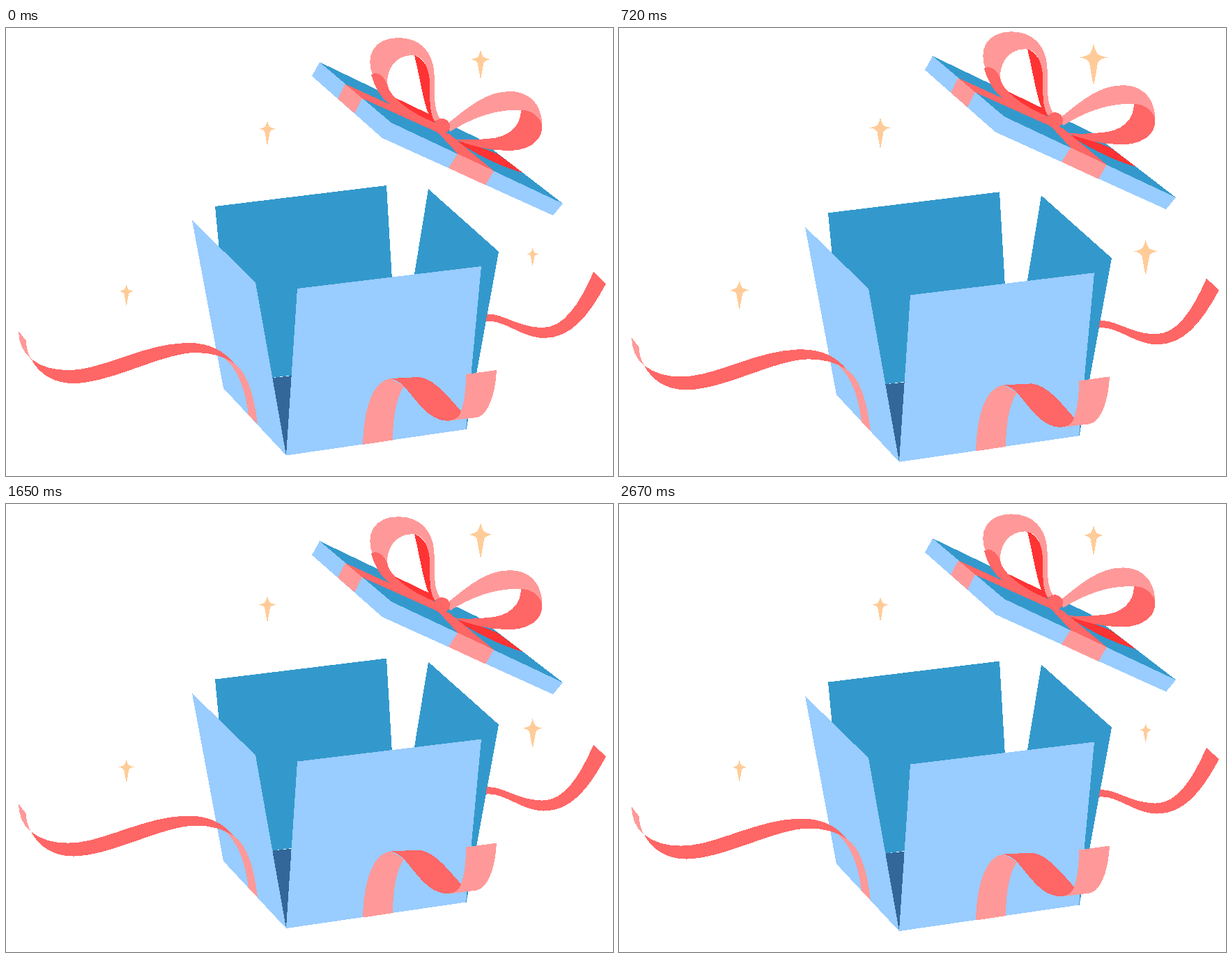
An HTML page for the animation above (2700 ms loop, 871x643 px).

```html
<!DOCTYPE html>
<html lang="en">
<head>
<meta charset="utf-8">
<title>Gift box</title>
<style>
  html, body { margin: 0; width: 100%; height: 100%; overflow: hidden; background: #fff; }
  svg { display: block; width: 100%; height: 100%; shape-rendering: crispEdges; }
  .sky { fill: #99ccff; }
  .blue { fill: #3399cc; }
  .navy { fill: #336699; }
  .pink { fill: #ff9999; }
  .coral { fill: #ff6666; }
  .red { fill: #ff3333; }
  .star { fill: #ffcc99; }
</style>
</head>
<body>
<svg viewBox="0 0 871 643">
  <g id="box">
    <path class="blue" d="M300 256L546 226L561 480L324 509Z"/>
    <path class="navy" d="M378 502.500L415 498.500L402 613.500Z"/>
    <path class="blue" d="M606 231L707 321L660.500 576L580 390Z"/>
    <path class="sky" d="M267 276L358 365L402 613.500L312 517Z"/>
    <path class="sky" d="M418 374L682 342L660 576L402 613.500Z"/>
    <!-- left ribbon -->
    <path class="pink" d="M18 435L29 449C29 460 32 468 36 475C24 466 18 450 18 435Z"/>
    <path class="pink" d="M303 467C315 471 322 476 327 481C346 494 356 526 361 569L348 556C344 522 333 482 303 467Z"/>
    <path class="coral" d="M36 475C55 490 80 493 105 490C150 484 205 452 262 452C292 452 312 463 327 481C312 471 295 466 272 466C225 466 150 510 97 510C68 510 48 497 36 475Z"/>
    <!-- right ribbon -->
    <path class="coral" d="M690 411C710 408 735 430 770 430C800 430 822 398 843 350L861 367C835 415 810 445 772 445C740 445 715 418 689 421Z"/>
    <!-- front ribbon -->
    <path class="pink" d="M512 598C513 550 525 506 552 503L571 514C560 530 555 560 555 591.500Z"/>
    <path class="coral" d="M552 503L592 501C615 503 635 530 653 550L650 560L634 564C605 563 590 535 571 514C566 509 560 505 552 503Z"/>
    <path class="pink" d="M660 497L704 491C702 530 690 557 675 559L634 564C645 563 651 558 653 550C658 535 660 520 660 497Z"/>
  </g>
  <g id="lid">
    <path class="blue" d="M450 49L677 158L799 252L553 136Z"/>
    <path class="sky" d="M450 49L553 136L799 252L785 269L540 158L439 69Z"/>
    <path class="pink" d="M487 80.500L511 101L500 122.500L476 101.500Z"/>
    <path class="pink" d="M648 180.500L700 205L688 225.500L635 201Z"/>
    <!-- bands across the lid -->
    <path class="red" d="M552 97L606 123L618 139C590 130 568 118 554 106Z"/>
    <path class="coral" d="M487 80.500L545 107L616 136L622 151L511 101Z"/>
    <path class="red" d="M643 161C670 167 690 174 706 181L742 208C715 200 690 190 643 161Z"/>
    <path class="coral" d="M618 148L636 152L700 205L648 180.500Z"/>
    <!-- left loop -->
    <path class="red" d="M586 39C602 44 610 65 611 90L618 134L612 134C600 118 596 80 586 39Z"/>
    <path class="pink" d="M527 70C514 40 528 14 563 14C595 14 611 35 614 60C617 90 611 112 623 131L615 134C604 115 611 90 607 68C603 48 595 39 582 39C558 40 547 59 547 79L549 88L535 84Z"/>
    <path class="coral" d="M524 67C530 62 542 66 547 81C550 99 580 122 616 136L614 144C585 133 565 122 553 111C537 101 529 85 524 67Z"/>
    <!-- right loop -->
    <path class="pink" d="M634 137C665 112 690 91 723 91C755 91 770 115 769 140C762 126 752 117 739 118C705 116 670 128 637 149Z"/>
    <path class="coral" d="M739 118C752 117 764 125 769 138C772 165 745 177 720 176C690 176 665 168 641 159C655 161 672 161 690 159C722 158 739 140 739 118Z"/>
    <ellipse class="coral" cx="625.500" cy="141" rx="11.500" ry="11"/>
  </g>
  <g id="stars"></g>
</svg>
<script>
  const LOOP = 2700, HALF = LOOP / 2, TICK = 30;
  const BOX_SHIFT = 10, LID_SHIFT = -9.4;
  const STAR = 'M0-.5Q.045-.3 .11-.235Q.2-.19 .34-.155Q.16-.13 .105-.03Q.07.2 .01.5H-.01Q-.07.2-.105-.03Q-.16-.13-.34-.155Q-.2-.19-.11-.235Q-.045-.3 0-.5Z';

  const box = document.getElementById('box');
  const lid = document.getElementById('lid');
  const sky = document.getElementById('stars');

  // Each star grows to its peak height twice per loop, resting at start and mid.
  const stars = [
    { x: 681, y: 51.5, start: 41, mid: 41, peak: 59 },
    { x: 375, y: 150.2, start: 34.5, mid: 30, peak: 44.5 },
    { x: 755.7, y: 328.4, start: 26, mid: 35, peak: 51 },
    { x: 172.8, y: 382.7, start: 30.5, mid: 25.5, peak: 42.2 }
  ];
  for (const s of stars) {
    s.el = document.createElementNS('http://www.w3.org/2000/svg', 'path');
    s.el.setAttribute('d', STAR);
    s.el.setAttribute('class', 'star');
    sky.appendChild(s.el);
  }

  // Linear pulse: 0 at the ends of each half loop, 1 in its middle.
  const pulse = t => 1 - Math.abs((t % HALF) / (HALF / 2) - 1);
  const move = (el, x, y, k = 1) =>
    el.setAttribute('transform', `translate(${x} ${y}) scale(${k})`);

  function draw(time) {
    const t = Math.floor((time % LOOP) / TICK) * TICK;
    const p = pulse(t);
    const swing = t < HALF ? p : -p;
    move(box, 0, BOX_SHIFT * swing);
    move(lid, 0, LID_SHIFT * swing);
    const nearMid = Math.abs(t - HALF) < HALF / 2;
    for (const s of stars) {
      const rest = nearMid ? s.mid : s.start;
      move(s.el, s.x, s.y, rest + (s.peak - rest) * p);
    }
  }

  let origin = null;
  function frame(now) {
    if (origin === null) origin = now;
    draw(Math.max(0, now - origin));
    requestAnimationFrame(frame);
  }
  draw(0);
  requestAnimationFrame(frame);
</script>
</body>
</html>
```
